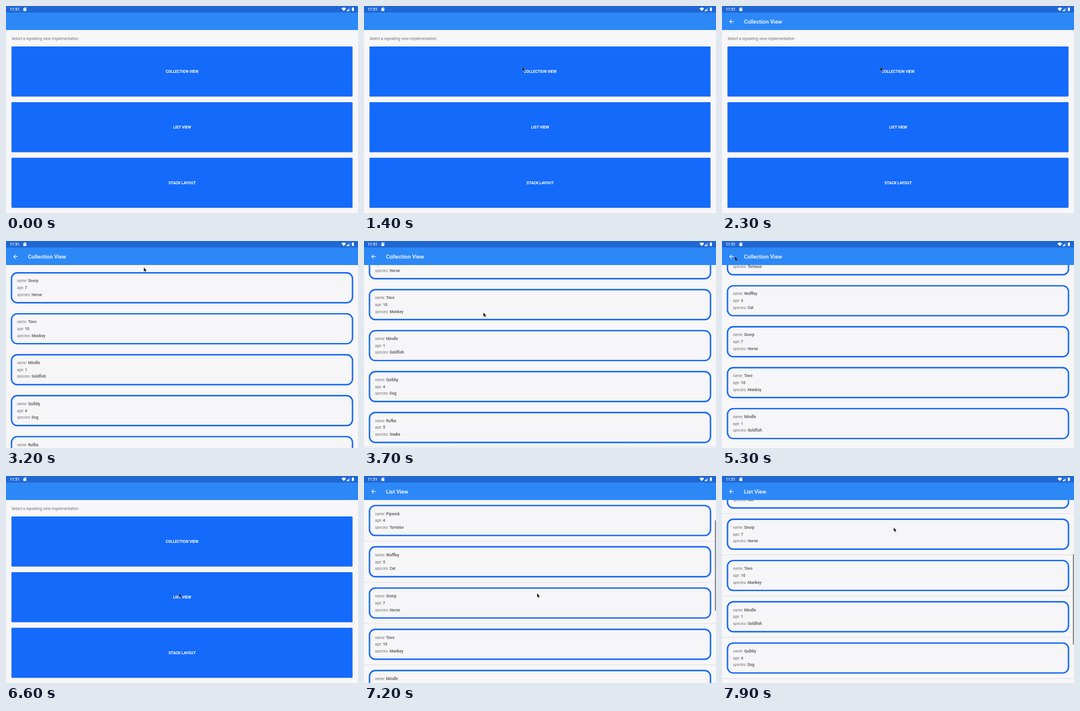
These frames come from a looping animation (600x353 px, 8000 ms). An HTML page:

```html
<!DOCTYPE html>
<html lang="en">
<head>
<meta charset="utf-8">
<title>Repeating views</title>
<style>
  html, body { margin: 0; width: 100%; height: 100%; overflow: hidden; background: #f7f6f8; }
  svg { display: block; width: 100%; height: 100%; font: 6.56px Roboto, sans-serif; }
  .caption { fill: #757575; }
  .button { fill: #146afb; }
  .button-text { fill: #fff; font-weight: 700; text-anchor: middle; }
  .card { fill: #f6f5f7; stroke: #1168f3; stroke-width: 2.4; }
  .label { fill: #757575; font-style: italic; }
  .value { fill: #686868; font-style: normal; font-weight: 700; }
  .title { fill: #fff; font-size: 9.375px; font-weight: 500; }
  .divider { stroke: #d9d9dc; stroke-width: .8; }
</style>
</head>
<body>
<svg viewBox="0 0 600 353" preserveAspectRatio="none">
  <defs>
    <clipPath id="body"><rect y="41" width="600" height="312"/></clipPath>
    <clipPath id="press"><rect id="pressArea" x="9.4" width="581.2" height="85.2" rx="1.2"/></clipPath>
  </defs>
  <rect width="600" height="353" fill="#f7f6f8"/>

  <g id="menu">
    <text class="caption" x="9.4" y="58">Select a repeating view implementation</text>
    <g id="buttons"></g>
    <circle id="ripple" fill="#fff" clip-path="url(#press)"/>
  </g>

  <g id="page" clip-path="url(#body)">
    <rect y="41" width="600" height="312" fill="#f7f6f8"/>
    <g id="collection"></g>
    <g id="list"></g>
    <ellipse id="glow" cx="300" cy="353" rx="420" fill="#2b88f6" opacity=".06"/>
    <rect id="thumb" x="598" width="2" fill="#8c8c90"/>
  </g>

  <rect y="11" width="600" height="30" fill="#2d88f7"/>
  <g id="header">
    <path fill="#fff" transform="translate(10.6 20.8) scale(.469)"
      d="M20 11H7.83l5.59-5.59L12 4l-8 8 8 8 1.41-1.41L7.83 13H20z"/>
    <text id="title" class="title" x="37.4" y="30.2"></text>
  </g>

  <rect width="600" height="11.2" fill="#2067d3"/>
  <g fill="#fff">
    <text x="6.4" y="8" font-weight="500">11:51</text>
    <path d="M31.4 2.4H34.6V8.6H29.6V4.2Z"/>
    <path stroke="#2067d3" stroke-width=".5" d="M31.8 3.2v1.5M32.8 3.2v1.5M33.8 3.2v1.5"/>
    <path d="M571.8 4.2Q575.8 1 579.8 4.2L575.8 8.8Z"/>
    <path opacity=".4" d="M586.4 2.4V8.7H580.2Z"/>
    <path d="M584 4.9V8.7H580.2Z"/>
    <path d="M589.6 2.9h1v-.7h1.4v.7h1V8.6h-3.4Z"/>
  </g>

  <path id="cursor" fill="#111" stroke="#fff" stroke-opacity=".6" stroke-width=".35"
    d="M0 0V7L1.6 5.6 2.7 8 3.9 7.5 2.9 5.2H5Z"/>
</svg>

<script>
const LOOP = 8000, STEP = 100, SETTLE = 400;
const TOP = 41, VIEW = 312;
const pets = [
  ['Pipwick', 4, 'Tortoise'], ['Wuffley', 3, 'Cat'], ['Snorp', 7, 'Horse'],
  ['Tovo', 10, 'Monkey'], ['Mindle', 1, 'Goldfish'], ['Quibby', 4, 'Dog'], ['Rufka', 5, 'Snake']
];

// Each view: its tapped button, when it is tapped, titled, faded in and left.
const views = [
  { id: 'collection', title: 'Collection View', button: 0, pitch: 69.84,
    tap: 1600, titled: 2000, open: 2300, untitled: 5700, close: 5800 },
  { id: 'list', title: 'List View', button: 1, pitch: 70.35,
    tap: 6600, titled: 6900, open: 7000, untitled: LOOP, close: LOOP }
];

// Pointer moves; a drag scrolls the open view and may end in a fling.
const entry = { x: 333, y: 42 };
const moves = [
  { start: 300, end: 600, x: 270, y: 104 },
  { start: 2700, end: 3100, x: 242, y: 1, drag: true, fling: 75 },
  { start: 3100, end: 3500, x: 207, y: 218 },
  { start: 3500, end: 3900, x: 200, y: 26, drag: true, fling: 0 },
  { start: 3900, end: 4500, x: 115, y: 107.5 },
  { start: 4500, end: 4900, x: 97.2, y: 198, drag: true, fling: -42.5 },
  { start: 4900, end: 5300, x: 22, y: 26.5 },
  { start: 5800, end: 6300, x: 295, y: 200 },
  { start: 7200, end: 7300, x: 294, y: 205 },
  { start: 7300, end: 7900, x: 292.7, y: 87.7, drag: true, fling: 0 }
];

const $ = id => document.getElementById(id);
const show = (id, on) => $(id).style.display = on ? '' : 'none';
const set = (id, attrs) => Object.entries(attrs).forEach(([k, v]) => $(id).setAttribute(k, v));
const clamp = (v, max = 1) => Math.max(0, Math.min(max, v));
const ease = p => (p + p * p * (3 - 2 * p)) / 2;
const settle = p => 1 - (1 - p) ** 2;
const buttonY = i => 69.1 + 94.85 * i;

function pointer(t) {
  let { x, y } = entry;
  for (const m of moves) {
    const p = ease(clamp((t - m.start) / (m.end - m.start)));
    x += (m.x - x) * p;
    y += (m.y - y) * p;
  }
  return { x, y };
}

function scrolling(view, t) {
  const limit = pets.length * view.pitch - VIEW;
  let scroll = 0, glow = 0;
  for (const m of moves) {
    if (!m.drag || m.start < view.open || m.start > t) continue;
    const after = clamp((t - m.end) / SETTLE);
    const wanted = scroll + pointer(m.start).y - pointer(Math.min(t, m.end)).y + m.fling * settle(after);
    scroll = clamp(wanted, limit);
    glow += Math.max(0, wanted - limit) * .04 * (1 - after);
  }
  return { scroll, glow };
}

function rows({ id, pitch }) {
  return pets.map((pet, i) => {
    const labels = ['name', 'age', 'species'].map((key, row) =>
      `<text class="label" x="18.75" y="${25.5 + row * 11.72}">${key}: <tspan class="value">${pet[row]}</tspan></text>`);
    const line = id === 'list' ? `<path class="divider" d="M0 ${pitch - .3}H600"/>` : '';
    return `<g transform="translate(0 ${i * pitch})">
      <rect class="card" x="9.4" y="9.4" width="581.2" height="51" rx="9.8"/>${labels.join('')}${line}</g>`;
  }).join('');
}

views.forEach(view => $(view.id).innerHTML = rows(view));
$('buttons').innerHTML = ['COLLECTION VIEW', 'LIST VIEW', 'STACK LAYOUT'].map((name, i) => `
  <rect x="9.2" y="${buttonY(i) + .6}" width="581.6" height="85.3" rx="1.4" opacity=".18"/>
  <rect class="button" x="9.4" y="${buttonY(i)}" width="581.2" height="85.2" rx="1.2"/>
  <text class="button-text" x="300.2" y="${buttonY(i) + 45}">${name}</text>`).join('');

function render(t) {
  const view = views[t < views[0].close ? 0 : 1];
  const { x, y } = pointer(t);
  const { scroll, glow } = scrolling(view, t);

  show('header', t >= view.titled && t < view.untitled);
  $('title').textContent = view.title;

  const open = clamp((t - view.open) / 200);
  set('page', { opacity: open });
  show('menu', open < 1);
  views.forEach(v => show(v.id, v === view));
  set(view.id, { transform: `translate(0 ${TOP - scroll})` });
  set('glow', { ry: glow });

  // The scrollbar counts an empty header and footer along with the rows.
  const slot = VIEW / (pets.length + 2);
  show('thumb', view.id === 'list');
  set('thumb', { y: TOP + slot * (1 + scroll / view.pitch), height: slot * VIEW / view.pitch });

  const press = (t - view.tap) / SETTLE;
  show('ripple', press > 0 && press < 1);
  set('pressArea', { y: buttonY(view.button) });
  set('ripple', { cx: x, cy: y, r: 340 * clamp(press), opacity: .08 * (1 - clamp(press)) });

  show('cursor', t >= moves[0].start);
  set('cursor', { transform: `translate(${x} ${y})` });
}

const start = performance.now();
function tick(now) {
  const t = Math.max(0, now - start) % LOOP;
  render(Math.floor(t / STEP) * STEP);
  requestAnimationFrame(tick);
}
render(0);
requestAnimationFrame(tick);
</script>
</body>
</html>
```
